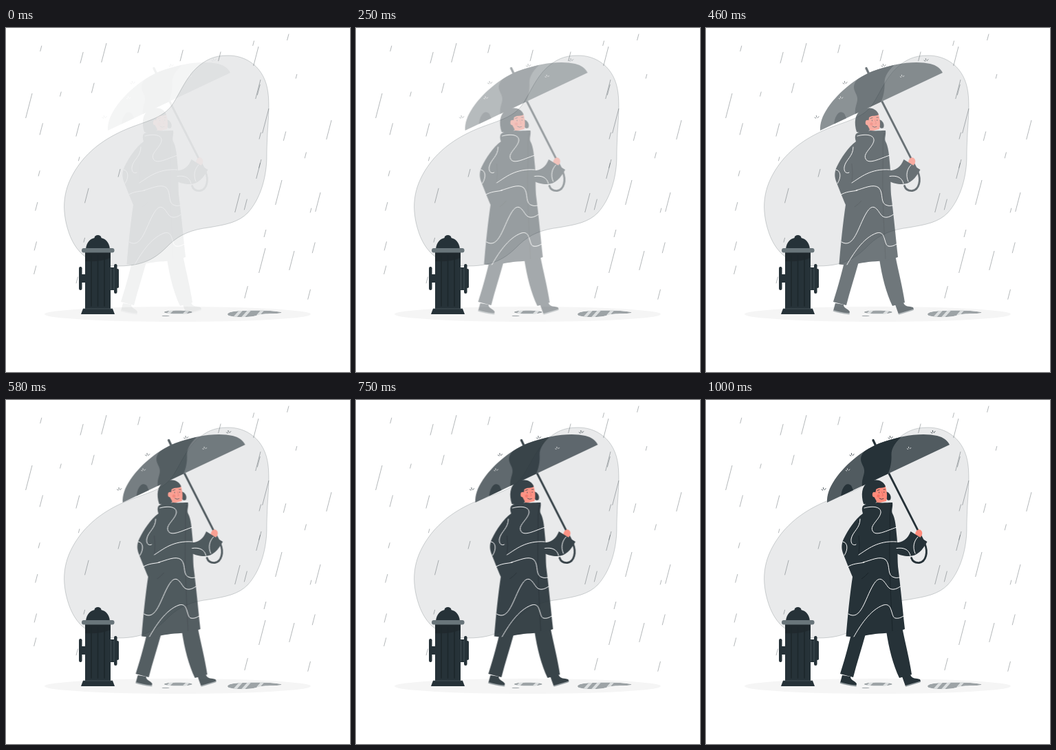
Recreate the animation shown at these times as an HTML page. Size 500 by 500 pixels, loop 1.04 s.

```html
<!DOCTYPE html>
<html lang="en">
<head>
<meta charset="utf-8">
<title>Walk in the rain</title>
<style>
  html, body { margin: 0; width: 100%; height: 100%; overflow: hidden; background: #fff; }
  svg { display: block; width: 100vw; height: 100vh; }
  .ink { fill: #263238; }
  .line { fill: none; stroke: #263238; stroke-linecap: round; }
  .pattern { fill: none; stroke: #fff; stroke-width: 1; stroke-linecap: round; stroke-linejoin: round; }
  .skin { fill: #ff8b7b; }
  #rain { fill: none; stroke: #263238; stroke-opacity: .5; stroke-width: .7; }
  #walker { will-change: transform, opacity; }
</style>
</head>
<body>
<svg viewBox="0 0 500 500">
  <defs>
    <path id="canopy" d="M176 149C175.500 138 179 128 187 116C200 97 223 75 252 63C284 51 315 47 336 52C345 54 351 59 354 65Z"/>
    <clipPath id="inCanopy"><use href="#canopy"/></clipPath>
    <path id="splash" d="M-3 0L-1.200 1.200M-.6-2.600L-.2-.2M3-1.400L1.400 .6"/>
    <clipPath id="inPuddles">
      <path id="puddles" d="M322 416C323 412 336 411 350 411C365 410 396 411 400.500 413.500C400 416 374 414.500 366 417C360 420.500 336 421 328 419C324 418.500 322 417.500 322 416ZM229.500 413C229.500 409.700 271 409.700 271 413C271 416.400 229.500 416.400 229.500 413ZM226 418.500C226 417.500 238 417.500 238 418.500C238 419.400 226 419.400 226 418.500Z"/>
    </clipPath>
  </defs>

  <path d="M321 40C350 39 377 58 381 95C384 122 379 145 379 190C378 222 368 250 352 268C338 283 318 286 295 290C270 293 253 300 238 314C222 330 206 346 163 346C125 346 100 330 89 290C80 257 84 228 108 196C128 170 155 155 180 145C208 134 231 130 244 108C254 92 262 72 277 58C290 46 303 40 321 40Z"
    fill="#e9eaeb" stroke="#263238" stroke-opacity=".5" stroke-width=".4"/>
  <ellipse cx="249.500" cy="416" rx="193.500" ry="11" fill="#f5f5f5"/>
  <path id="rain"/>

  <g clip-path="url(#inPuddles)">
    <use href="#puddles" fill="#9da3a6"/>
    <path d="M331 422L343 409M343 422L355 409M366 418L374 409M234 417L242 409M258 417L266 409" stroke="#dcdfe0" stroke-width="4"/>
  </g>

  <g id="walker">
    <g class="ink">
      <path d="M211 340C206 362 200 382 195 398L214 403C219 383 226 362 232 340Z"/>
      <path d="M262 336C266 362 272 385 281 404L299 399C296 378 290 355 285 330Z"/>
      <path d="M198 400L210 402C210 408 217 408 219 412.500L218 416L195 411Z"/>
      <path d="M285 402L297 399C299 406 306 404 311 406L312 409L290 416Z"/>
    </g>
    <path d="M195 410.800C202 413.500 210 414.500 218.500 415.500M290 415.800L311.500 409.500" stroke="#8d969a" stroke-width="1.800" fill="none"/>

    <path class="line" stroke-width="3.200" d="M243 58.500L247 67"/>
    <path class="line" stroke-width="2.800" d="M265 105L318 209C323 221 320 235 310 236.500C304 237 300 234 298.500 229.500"/>
    <use href="#canopy" fill="#515b60"/>
    <g class="ink" clip-path="url(#inCanopy)">
      <path d="M247 62C233 71 225 77 225 86C225 93 231 97 230 105C229 112 226 116 227 126L264 108.500C268 100 270 90 269.500 80C269 70 276 60 288 50Z"/>
      <path d="M196 141C197 128 203 120 209 123C213 125 212 129 215 132Z"/>
    </g>
    <g class="line" stroke-width=".8">
      <use href="#splash" x="171" y="130"/>
      <use href="#splash" x="212" y="80"/>
      <use href="#splash" x="268" y="55"/>
      <use href="#splash" x="330" y="47"/>
    </g>
    <g fill="none" stroke="#fff" stroke-width=".8">
      <use href="#splash" x="206" y="102"/>
      <use href="#splash" x="295" y="70.500"/>
    </g>

    <path class="ink" d="M261 133C267 134 270 140 268 145C265 147 260 146 261 133Z"/>
    <path class="skin" d="M242 128C250 128 255 125 260 124C263 130 264 141 262 147L249 150L243 143Z"/>
    <path class="ink" d="M229 151C225 138 226 125 236 119C245 114 258 116 261 126C257 128.500 251 126.500 247 130C247 133 246 135 244 138C244 142 247 144 248 148L242 154Z"/>
    <ellipse class="skin" cx="244.500" cy="137.500" rx="2.700" ry="3.800"/>
    <circle cx="250.500" cy="139.500" r="2.200" fill="#f56f62"/>
    <path class="line" stroke-width=".8" d="M249 131.500L252 130.500M258 130L260.500 130M251.500 134V135M258.800 133.500V134.500M252 143Q255 145.500 258 143.500"/>
    <path d="M255.500 133L257.500 139L255.500 139.300" fill="none" stroke="#dd5e56" stroke-width=".6"/>

    <path class="skin" d="M304 195C305 189 309 187 312 189C315 191 315 196 312 199L306 200Z"/>
    <g class="ink">
      <path d="M228 154C234 149 242 151 249 149C256 150 264 149 271 149C272 156 269 160 271 165C275 172 276 183 277 195C279 212 278 225 279 242C283 273 286 306 289 333C276 338 260 339 246 340C231 342 218 346 203.500 343.500C206 314 209 284 213 257C209 248 204 235 200 225C196 215 197 209 200 202C207 188 216 174 228 165C227 161 226 158 228 154Z"/>
      <path d="M274 207C284 208 293 203 297.500 191L321.500 206C315 218 307 227 295 227C287 227 281 225 277 223Z"/>
    </g>
    <path fill="none" stroke="#172126" stroke-width=".8" d="M269 152C266 165 268 182 267 205C266 245 269 290 271 336M226 260Q231 257 236 251M222 225Q224 211 222 197"/>
    <path class="pattern" d="M230 157C240 154 255 154 254 164C252 174 238 182 242 190C246 199 262 190 277 185
      M224 173C224 187 213 191 211 202C210 210 215 212 218 210
      M199 206C206 207 207 217 201 226
      M222 225C235 217 249 204 277 206
      M205 243C214 237 222 238 230 236M228 236C240 233 253 226 261 232C269 240 262 256 274 258C277 259 279 258 281 258
      M207 311C225 322 231 289 243 269C253 252 259 264 264 271C269 278 277 275 282.500 271
      M215 344C223 330 238 305 258 298C272 294 268 315 275 317C280 318 284 316 287 314
      M308 199C302 205 300 214 304 223M277 215.500C287 214 295 217 297 226"/>
  </g>

  <g class="ink">
    <ellipse cx="133.500" cy="305" rx="5" ry="4"/>
    <path d="M116 321C117 311 123 304.500 133.500 304.500C144 304.500 150 311 151 321Z"/>
    <rect x="109" y="358" width="8" height="12"/>
    <rect x="106" y="347" width="4.500" height="34" rx="2.200"/>
    <rect x="151" y="348" width="8" height="33"/>
    <rect x="160" y="350" width="4" height="28" rx="1.800"/>
    <rect x="157" y="343" width="4.500" height="43" rx="2.200"/>
    <rect x="115" y="325" width="37" height="84"/>
    <path d="M112 408H155L158 416H109Z"/>
  </g>
  <path d="M115 326H152V334C140 339 126 340 115 339Z" fill="#20292e"/>
  <path d="M124 331V404M133.500 331V404M143 331V404" stroke="#1e282d" stroke-width="1.800" stroke-linecap="round"/>
  <path d="M112 408H155M152.500 349V380M157 349V380" stroke="#56646a" stroke-width=".6"/>
  <rect x="110" y="320" width="47.500" height="6.400" rx="3" fill="#69757a"/>
</svg>
<script>
  const random = n => {
    const v = Math.sin(n * 12.9898 + 4.1) * 43758.5453;
    return v - Math.floor(v);
  };
  const drop = (x, y, h) => `M${x} ${y}l${-h * .26} ${h}`;

  // The longest drops are placed by hand; short ones fill a jittered grid.
  const long = [[38,95], [382,117], [401,221], [377,320]];
  const middle = [[146,22], [367,27], [370,75], [473,134], [457,239], [371,191], [340,240], [419,324]];
  let rain = long.map(([x, y]) => drop(x, y, 36)).join('')
           + middle.map(([x, y]) => drop(x, y, 28)).join('');
  const COLS = 7, ROWS = 7;
  for (let i = 0; i < COLS * ROWS; i++) {
    const x = 34 + 62 * (i % COLS + .75 * random(i));
    const y = 8 + 56 * (Math.floor(i / COLS) + .75 * random(i + 100));
    const behindWalker = x > 172 && x < 330 && y > 50;
    if (!behindWalker) rain += drop(x, y, 6 + 16 * random(i + 200));
  }
  document.getElementById('rain').setAttribute('d', rain);

  const LOOP = 1040, STEPS = 25, SHIFT = 30;
  const walker = document.getElementById('walker');

  // cubic-bezier(0, 0, .58, 1)
  function easeOut(x) {
    let lo = 0, hi = 1;
    for (let i = 0; i < 24; i++) {
      const s = (lo + hi) / 2;
      if (s * s * (1.74 - .74 * s) < x) lo = s; else hi = s;
    }
    return hi * hi * (3 - 2 * hi);
  }

  // The slide advances 24 times a second, on 10 ms ticks.
  function draw() {
    const t = performance.now() % LOOP;
    const step = Math.min(STEPS, Math.floor((t + 5) * 24 / 1000) + 1);
    const p = easeOut(step / STEPS);
    walker.setAttribute('opacity', p.toFixed(4));
    walker.setAttribute('transform', `translate(${(SHIFT * (p - 1)).toFixed(3)})`);
    requestAnimationFrame(draw);
  }
  draw();
</script>
</body>
</html>
```
